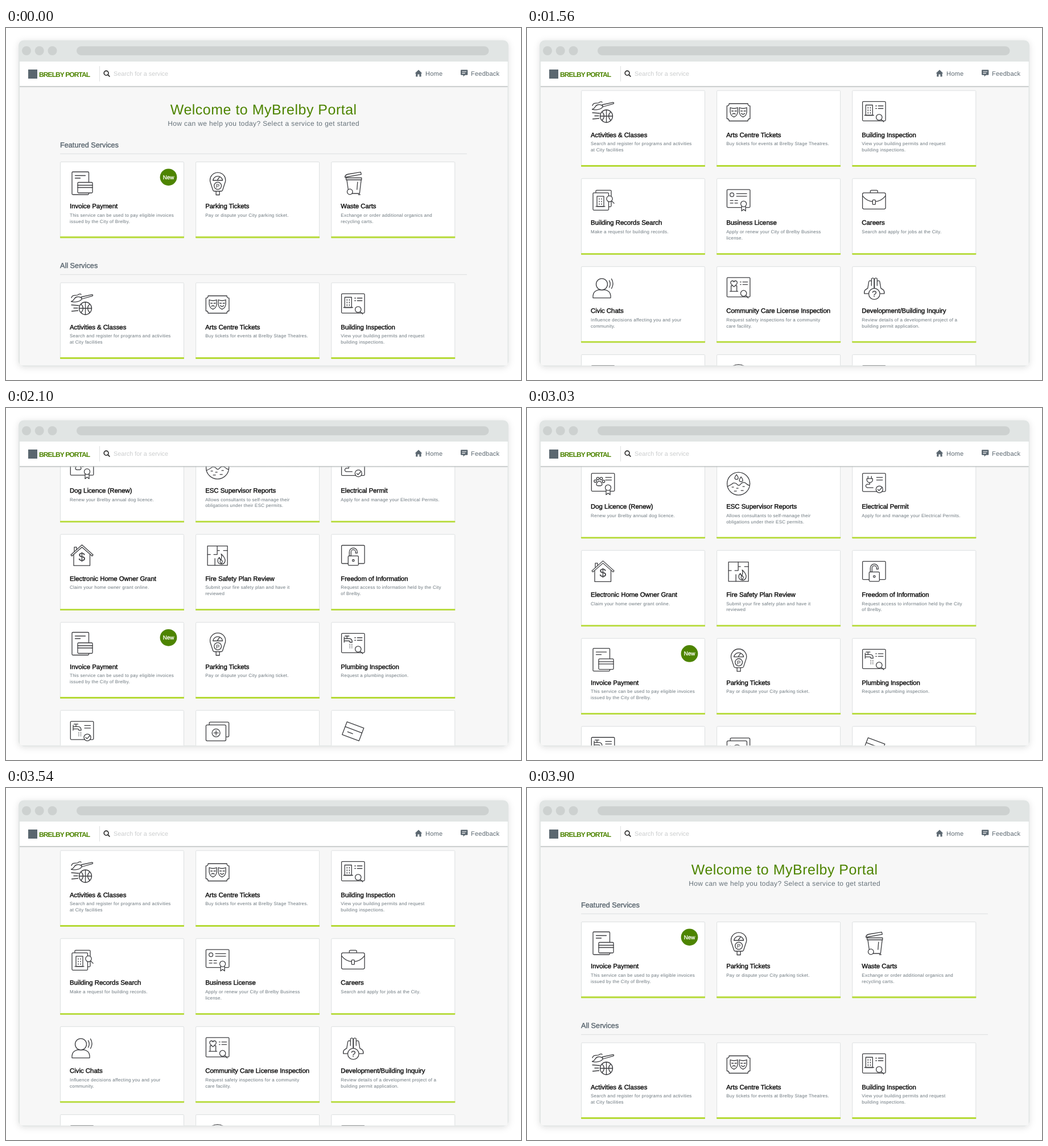
An HTML page for the animation above (5.4 s loop, 905 px wide and 619 px high).

```html
<!DOCTYPE html>
<html lang="en">
<head>
<meta charset="utf-8">
<title>Service portal</title>
<style>
  html, body { margin: 0; width: 100%; height: 100%; overflow: hidden; background: #fff; }
  svg { display: block; width: 905px; height: 619px; }
  text { font-family: "Liberation Sans", Arial, sans-serif; text-rendering: geometricPrecision; }
  .heading { font-size: 12.7px; fill: #5b6770; stroke: #5b6770; stroke-width: .4; }
  .name { font-size: 11.4px; fill: #0c0c0c; stroke: #0c0c0c; stroke-width: .4; }
  .about { font-size: 8px; letter-spacing: .25px; fill: #6b767d; }
  .nav { font-size: 11px; letter-spacing: .25px; fill: #5b6770; }
  .badge { font-size: 9.8px; fill: #fff; stroke: #fff; stroke-width: .35; }
  .icon { fill: #fff; stroke: #3c3d40; stroke-width: 1.3; stroke-linecap: round; stroke-linejoin: round; }
  .icon text { fill: #3c3d40; stroke-width: .1; text-anchor: middle; }
</style>
</head>
<body>
<svg viewBox="0 0 905 619">
  <defs>
    <clipPath id="view"><rect x="24" y="102" width="857.5" height="491.5"/></clipPath>
    <filter id="glow" x="-5%" y="-5%" width="110%" height="112%">
      <feDropShadow dx="0" dy="2" stdDeviation="6" flood-opacity=".12"/>
    </filter>
    <linearGradient id="edge" x2="0" y2="1">
      <stop stop-color="#b9bebe"/><stop offset="1" stop-color="#b9bebe" stop-opacity="0"/>
    </linearGradient>
  </defs>

  <rect x="22" y="21.5" width="861" height="573.5" rx="9" fill="#e1e5e4" filter="url(#glow)"/>
  <g fill="#cdd1d0">
    <circle cx="36" cy="40" r="8"/><circle cx="58.7" cy="40" r="8"/><circle cx="81.5" cy="40" r="8"/>
    <rect x="124" y="32.3" width="724.5" height="15.6" rx="7.8"/>
  </g>
  <path d="M24 59H881.5V589.5q0 4-4 4H28q-4 0-4-4z" fill="#f7f7f7"/>

  <g clip-path="url(#view)"><g id="page">
    <text x="452.7" y="151.8" text-anchor="middle" font-size="25" letter-spacing=".5" fill="#4d8400">Welcome to MyBrelby Portal</text>
    <text x="452.6" y="172.3" text-anchor="middle" font-size="12" letter-spacing=".38" fill="#66727a">How can we help you today? Select a service to get started</text>
    <text class="heading" x="95" y="209.6">Featured Services</text>
    <text class="heading" x="95" y="422.2">All Services</text>
    <path d="M95 221.2H810M95 433.7H810" stroke="#dcdedf"/>
  </g></g>

  <rect x="24" y="59" width="857.5" height="43" fill="#fff"/>
  <rect x="24" y="102" width="857.5" height="3" fill="url(#edge)"/>
  <rect x="39" y="73" width="16" height="16" fill="#5b6770"/>
  <text x="58" y="86.3" font-size="12" font-weight="bold" letter-spacing="-.9" fill="#4d8400">BRELBY PORTAL</text>
  <path d="M164.5 67V94" stroke="#dfe1e1"/>
  <path d="M180 79.3a3.9 3.9 0 1 1-7.8 0a3.9 3.9 0 1 1 7.8 0M179.2 82.4L182.4 85.6" fill="none" stroke="#222" stroke-width="1.6"/>
  <text x="189" y="84.3" font-size="10.8" fill="#cbcdce">Search for a service</text>
  <path d="M725 73.6L731.3 79.8H729.6V85.4H726.4V81.4H723.4V85.4H720.2V79.8H718.5z" fill="#5b6770"/>
  <text class="nav" x="737" y="84.3">Home</text>
  <path d="M800 73.6H810.3q1 0 1 1V81.7q0 1-1 1H806.6L803.6 85.5V82.7H800q-1 0-1-1V74.6q0-1 1-1z" fill="#5b6770"/>
  <path d="M801.4 76.7H809M801.4 79.6H806.8" stroke="#fff" stroke-width="1.1"/>
  <text class="nav" x="817" y="84.3">Feedback</text>
</svg>

<script>
// Icon shapes, in coordinates relative to the card's top left corner.
const path = (d, attrs = '') => `<path d="${d}" ${attrs}/>`;
const line = d => path(d, 'fill="none"');
const circle = (x, y, r) => `<circle cx="${x}" cy="${y}" r="${r}"/>`;
const rect = (x, y, w, h, r = 1.5) => `<rect x="${x}" y="${y}" width="${w}" height="${h}" rx="${r}"/>`;
const glyph = (x, y, size, s) => `<text x="${x}" y="${y}" font-size="${size}">${s}</text>`;
const mirror = (shape, axis) => shape + `<g transform="translate(${2 * axis} 0) scale(-1 1)">${shape}</g>`;

const lens = (x, y) => path(`M${x + 3.7} ${y + 3.7}l4.4 4.4`) + circle(x, y, 5.2);
const list = path('M41.5 27.5h1.5M46 27.5h8.5M41.5 32h1.5M46 32h8.5');
const lines = path('M43 27h10.5M43 31.5h10.5');
const inspection = art => rect(18.3, 19.8, 40.5, 34) + list + art + lens(47.5, 47.5);
const certificate = art => rect(18.3, 19.8, 40.5, 31.5) + art +
  path('M44 48v9.5l3.5-2.8 3.5 2.8v-9.5z') + circle(47.5, 45, 5);
const permit = art => rect(18.3, 19.8, 40.5, 32) + lines + art +
  circle(48, 48, 6) + line('M45 48l2.3 2.3 5-5.3');
const tower = (x, y) => rect(x, y, 12, 18, 0) + path(`M${x - 2} ${y + 18}h16`) +
  path(`M${x + 4} ${y + 4}v11M${x + 8} ${y + 4}v11`, 'stroke-dasharray="1.5 3"');
const tap = line('M23 29h9q5 0 5 6.5h-4q0-2.5-2-2.5h-8M23 26.5v9M28 29v-4M24.5 24.5h7') +
  path('M33 39v8M36.5 39v8', 'stroke-dasharray=".5 2.4"');

const icons = {
  invoice: rect(21, 18, 29.5, 40) + path('M26.5 24.5h18M26.5 29h9') +
    rect(31, 36.5, 26, 18.5) + path('M31 41.5h26M31 45.5h26'),
  meter: path('M36 52v6.5h6v-6.5') +
    path('M30.5 50L25.6 35A13.6 13.6 0 1 1 52.4 35L47.5 50q-.6 2-2.5 2h-12q-2 0-2.5-2z') +
    path('M30.5 33A8.6 8.6 0 0 1 47.5 33zM38.5 32l3.3-4.5') + circle(39, 42.5, 6.4) + glyph(39, 46, 9.5, 'P'),
  bin: path('M27.5 31L31 56H50L53 31M46.5 36l-1 13') + path('M26 28.5H53.5V32H26.5z') +
    path('M24.3 27.5q0-4.5 6-5.5L52 18.3l1 4z') + circle(33, 53, 4.8) + path('M48 58h3'),
  sport: path('M19.5 33.5c6-1 4-7 10-8 4-1 8 1 9 3-2 5-12 7-19 5z') + path('M37 25.5L56 21.3q2.5 0 1 2.4L38.5 29z') +
    line('M20 27c2-7 8-3 11-5q4-3 6-1') + path('M20 39.5l13 1M24 45h7M20.5 50.5l11-1') +
    circle(44.5, 45.5, 11) + line('M44.5 34.5v22M33.5 45.5h22M37 38q7 7 0 15M52 38q-7 7 0 15'),
  masks: path('M22 23.5h33q0 4 3.8 4v22.5q-3.8 0-3.8 4h-33q0-4-3.8-4v-22.5q3.8 0 3.8-4z') +
    mirror(path('M24 30.5q6.5 3 13 0v8q-1 7-6.5 8.5q-5.5-1.5-6.5-8.5z'), 38.5) +
    line('M26.5 36.5h3M32 36.5h3M28 42q2.5-2.5 5 0M42.5 36.5h3M48 36.5h3M43.5 40.5q3 3.5 6 0'),
  building: inspection(tower(24, 26)),
  records: rect(26, 21, 27, 29) + rect(21, 25.5, 27.5, 30.5) + tower(28, 31.5) + lens(50, 36),
  license: certificate(circle(27, 29, 3.4) + path('M35 27h18M35 31.5h18') +
    path('M24 39h13M24 43.5h13', 'stroke-dasharray="5 3"')),
  briefcase: path('M32 26v-3q0-2 2-2h9q2 0 2 2v3') + rect(18.3, 25.5, 40.5, 28.5, 2.5) +
    path('M18.5 31q7 9 18 10h4q11-1 18-10') + rect(36, 38, 5, 8, 1),
  speaker: path('M21 55.5v-4q1-8 9-10h13q8 2 9 10v4z') + circle(36.5, 31.5, 10) +
    line('M49.5 25q3.5 6 0 12M53.5 22q5 8.5 0 17'),
  care: inspection(path('M25.5 44V34h10v10M23.5 44h14') +
    path('M30.5 36l-5-5q-2-4 1.5-5.5 2.5-.5 3.5 2 1-2.5 3.5-2 3.5 1.5 1.5 5.5z')),
  inquiry: mirror(line('M38.6 40V22q-2.3-3-4.6 0v12M34 26q-3.5-2-4.6 1l-1.9 11.5-4.5 3q-2 2-1.5 6.5h7'), 39) +
    circle(39, 48.5, 9.8) + glyph(39, 54, 15.5, '?'),
  paw: certificate(lines + path('M32 33.5q3 0 5 5 0 4-5 3-5 1-5-3 2-5 5-5z') +
    circle(25, 33.5, 2.2) + circle(29.5, 29, 2.2) + circle(35.5, 29, 2.2) + circle(39.5, 34, 2.2)),
  erosion: circle(38.5, 38, 20) + line('M19 43q7-3 10-6 5-1 7 2 3 4 6 0 4-5 9-2 4 4 7 4') +
    path('M35 22q-6 8 0 8.5 6-.5 0-8.5M43 26q-6 8 0 8.5 6-.5 0-8.5') +
    path('M27 44h3M35 46h3M46 43h3M31 51h4M43 50h4'),
  plug: permit(line('M28 29v-4M34 29v-4M26 29h10v3q-1 4-5 4t-5-4zM31 36v3h-5q-4 3 0 6h11')),
  house: path('M24 36V55.5H52.5V36M25 31v-8h4v5') +
    path('M19 36.5l19.5-17.5 19.5 17.5-1.8 2-17.7-15.5-17.7 15.5z') + glyph(38.3, 47.5, 21, '$'),
  plan: rect(21, 21, 35, 34, 0) + path('M21 36h5M32 36h6v-15M38 29h4M49 29h7M34 55v-12') +
    path('M45 35q7 6 7 12-1 6-7 6-6-1-6-6 0-4 3-6 0 3 2 4 3-4 1-10z') + path('M45 52q-4-4 0-7 4 3 0 7'),
  lock: rect(18.3, 19.8, 40.5, 32) + path('M32 38.5V31.5a7 7 0 0 1 14 0v2h-3v-2a4 4 0 0 0-8 0v7z') +
    rect(30, 38.5, 18, 16.5) + circle(39, 46.5, 1.7),
  tapInspection: inspection(tap),
  tapPermit: permit(tap),
  money: rect(24, 21, 34.5, 26, 2) + rect(18.3, 26, 35, 28, 2) + circle(36, 40, 7) + path('M36 36v8M32 40h8'),
  ticket: path('M28 20.5L57.5 31.5L49 54L19.5 43z') + path('M25 29l29 11M29 38l9 3.5')
};

const invoicePayment = ['invoice', 'Invoice Payment',
  'This service can be used to pay eligible invoices|issued by the City of Brelby.', true];
const parkingTickets = ['meter', 'Parking Tickets', 'Pay or dispute your City parking ticket.'];

const cards = [
  invoicePayment,
  parkingTickets,
  ['bin', 'Waste Carts', 'Exchange or order additional organics and|recycling carts.'],
  ['sport', 'Activities &amp; Classes', 'Search and register for programs and activities|at City facilities'],
  ['masks', 'Arts Centre Tickets', 'Buy tickets for events at Brelby Stage Theatres.'],
  ['building', 'Building Inspection', 'View your building permits and request|building inspections.'],
  ['records', 'Building Records Search', 'Make a request for building records.'],
  ['license', 'Business License', 'Apply or renew your City of Brelby Business|license.'],
  ['briefcase', 'Careers', 'Search and apply for jobs at the City.'],
  ['speaker', 'Civic Chats', 'Influence decisions affecting you and your|community.'],
  ['care', 'Community Care License Inspection', 'Request safety inspections for a community|care facility.'],
  ['inquiry', 'Development/Building Inquiry', 'Review details of a development project of a|building permit application.'],
  ['paw', 'Dog Licence (Renew)', 'Renew your Brelby annual dog licence.'],
  ['erosion', 'ESC Supervisor Reports', 'Allows consultants to self-manage their|obligations under their ESC permits.'],
  ['plug', 'Electrical Permit', 'Apply for and manage your Electrical Permits.'],
  ['house', 'Electronic Home Owner Grant', 'Claim your home owner grant online.'],
  ['plan', 'Fire Safety Plan Review', 'Submit your fire safety plan and have it|reviewed'],
  ['lock', 'Freedom of Information', 'Request access to information held by the City|of Brelby.'],
  invoicePayment,
  parkingTickets,
  ['tapInspection', 'Plumbing Inspection', 'Request a plumbing inspection.'],
  ['tapPermit', 'Plumbing Permit', 'Apply for a plumbing permit.'],
  ['money', 'Property Taxes', 'View your property tax account.'],
  ['ticket', 'Report a Problem', 'Send a service request to the City.']
];

function drawCard([icon, name, about, isNew], i) {
  const row = Math.floor(i / 3);
  const x = 95 + 238.15 * (i % 3);
  const y = row ? 447.5 + 154.8 * (row - 1) : 235;
  const aboutLines = about.split('|').map((text, n) =>
    `<text class="about" x="17" y="${96.7 + 10.8 * n}">${text}</text>`).join('');
  const badge = isNew ? `<circle cx="190.5" cy="27.3" r="14.9" fill="#4d8400"/>
    <text class="badge" x="190.5" y="30.8" text-anchor="middle">New</text>` : '';
  return `<g transform="translate(${x} ${y})">
    <rect x=".5" y=".5" width="217" height="133" rx="1.5" fill="#fff" stroke="#dcdfe0"/>
    <rect y="131.6" width="218" height="2.8" rx=".6" fill="#b5da36"/>
    <g class="icon">${icons[icon]}</g>
    <text class="name" x="17" y="82.2">${name}</text>${aboutLines}${badge}</g>`;
}

const page = document.getElementById('page');
page.insertAdjacentHTML('beforeend', cards.map(drawCard).join(''));

const LOOP = 5400, TICK = 30, SCROLL = 845, STEPS = 30;
const stepsSince = (tick, start) => Math.min(STEPS, Math.max(0, tick - start));

function render() {
  const tick = Math.floor(performance.now() % LOOP / TICK);
  const steps = stepsSince(tick, 40) - stepsSince(tick, 100);
  page.setAttribute('transform', `translate(0 ${-SCROLL * steps / STEPS})`);
  requestAnimationFrame(render);
}
render();
</script>
</body>
</html>
```
